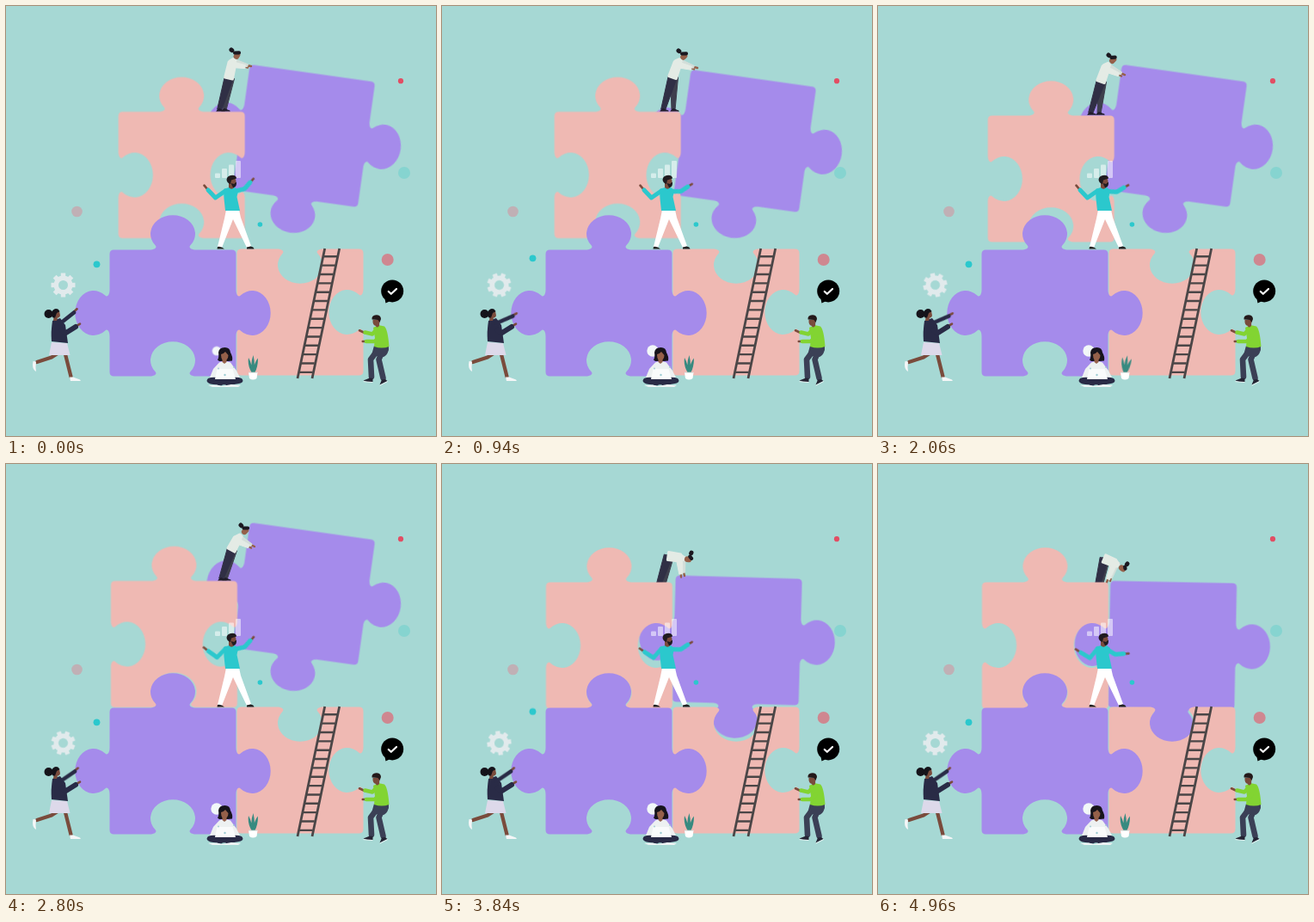
Write an HTML page that moves like this. It is 500 px wide and 500 px high and loops after 4.98 s.

```html
<!DOCTYPE html>
<html lang="en">
<head>
<meta charset="utf-8">
<title>Puzzle team</title>
<style>
html, body { margin: 0; width: 100%; height: 100%; overflow: hidden; background: #a6d8d4; }
svg { display: block; width: 100vw; height: 100vh; }
.pink { fill: #efb9b3; }
.purple { fill: #a58beb; }
.navy { fill: #292b46; color: #292b46; }
.skin { fill: #7a4b3c; color: #7a4b3c; }
.tan { fill: #95604a; color: #95604a; }
.teal { fill: #2bc8cd; color: #2bc8cd; }
.green { fill: #82d432; color: #82d432; }
.line, .line path { fill: none; stroke: currentColor; stroke-linecap: round; stroke-linejoin: round; }
.move { animation: 4.98s linear infinite; }

#tilted { animation-name: drop; }
@keyframes drop {
  0% { transform: translate(346.3px, 151px) rotate(8deg); animation-timing-function: ease-in-out; }
  19.3% { transform: translate(352.2px, 157px) rotate(8deg); animation-timing-function: ease-in-out; }
  39.8%, 62.8% { transform: translate(346.3px, 151px) rotate(8deg); animation-timing-function: cubic-bezier(.45, 0, .6, .92); }
  77.1% { transform: translate(343.2px, 205px) rotate(1.6deg); animation-timing-function: cubic-bezier(.2, .5, .5, 1); }
  100% { transform: translate(342.3px, 210.7px) rotate(1.1deg); }
}
#sliding { animation-name: slide; }
@keyframes slide {
  0%, 32% { transform: translate(204.2px, 196.5px); animation-timing-function: cubic-bezier(.25, 0, .45, 1); }
  66.3%, 100% { transform: translate(194.4px, 211px); }
}
#gear { animation-name: spin; transform-origin: 66.5px 324.5px; }
@keyframes spin { to { transform: rotate(-360deg); } }

#bob { animation-name: bob; animation-timing-function: ease-in-out; }
@keyframes bob {
  0%, 40%, 57%, 100% { transform: translateY(0); }
  19% { transform: translateY(-7px); }
  77% { transform: translateY(-12.5px); }
}
#wave { animation-name: wave; transform-origin: 266px 215px; animation-timing-function: ease-in-out; }
@keyframes wave {
  0% { transform: rotate(-32deg); }
  19% { transform: rotate(-17deg); }
  36%, 42% { transform: rotate(-14deg); }
  56.5% { transform: rotate(-31deg); }
  77% { transform: rotate(-17deg); }
  100% { transform: rotate(13deg); }
}
#lift { animation-name: lift; transform-origin: 254px 214px; animation-timing-function: ease-in-out; }
@keyframes lift {
  0%, 42% { transform: rotate(0deg); }
  56% { transform: rotate(-11deg); }
  77% { transform: rotate(-14deg); }
  100% { transform: rotate(-16deg); }
}
#reach { animation-name: reach; transform-origin: 65px 371px; animation-timing-function: ease-in-out; }
@keyframes reach {
  0% { transform: rotate(0deg); }
  19%, 42% { transform: rotate(15deg); }
  56.5%, 100% { transform: rotate(4deg); }
}
#leaves { animation-name: sway; transform-origin: 287px 426px; animation-timing-function: ease-in-out; }
@keyframes sway {
  0%, 19%, 56%, 77%, 100% { transform: rotate(0deg); }
  31%, 42% { transform: rotate(7deg); }
}
#thought { animation-name: swell; transform-origin: 245px 401px; animation-timing-function: ease-out; }
@keyframes swell { 0% { transform: scale(.78); } 8%, 100% { transform: scale(1); } }
</style>
</head>
<body>
<svg viewBox="0 0 500 500">
  <rect width="500" height="500" fill="#a6d8d4"/>

  <!-- puzzle and climber -->
  <g id="tilted" class="move"><path class="purple" data-sides="0 1 1 1"/></g>
  <g id="climber"></g>
  <g id="sliding" class="move"><path class="pink" data-sides="1 -1 -1 -1"/></g>
  <g transform="translate(342 356)"><path class="pink" data-sides="-1 -1 0 0"/></g>
  <g transform="translate(194 357)"><path class="purple" data-sides="1 1 -1 1"/></g>

  <!-- dots -->
  <circle cx="82.5" cy="239" r="6.3" fill="#c0b0b5"/>
  <circle id="bob" class="move" cx="105.5" cy="300.3" r="3.9" fill="#2bc8cd"/>
  <circle cx="295.4" cy="254" r="2.8" fill="#2bc8cd"/>
  <circle cx="459" cy="87.2" r="3.1" fill="#e24d63"/>
  <circle cx="463" cy="194" r="7" fill="#86d4d0"/>
  <circle cx="443.7" cy="295" r="7" fill="#cf8790"/>

  <!-- chart bars -->
  <g fill="#fff" opacity=".53">
    <rect x="243" y="194.5" width="6" height="5.5" rx="1"/>
    <rect x="251" y="189" width="6" height="11" rx="1"/>
    <rect x="259" y="184.5" width="6" height="15.5" rx="1"/>
    <rect x="267" y="180" width="6" height="20" rx="1"/>
  </g>

  <g id="gear" class="move" fill="none" stroke="#e1eaec"></g>

  <g id="ladder" fill="none" stroke="#4b4647"></g>

  <!-- chat badge -->
  <circle cx="449.2" cy="331.4" r="13"/>
  <path d="M440 338L441.5 345.5L449 342Z"/>
  <path class="line" color="#fff" d="M444.8 332L447.8 334.8L454 329" stroke-width="2.2"/>

  <!-- man in the middle -->
  <g>
    <path d="M256 237H271L273 246L285 279L280 281L264 248L251 281L246 280L254 247Z" fill="#fff"/>
    <path d="M246 280Q250 279 254 282.5H245.5ZM280 280.5L284.5 279.5Q288 280 288.5 282.5H280Z" fill="#222"/>
    <g id="lift" class="move line">
      <path class="skin" d="M235 214L230.5 208.7" stroke-width="2.6"/>
      <path class="teal" d="M255 215L243.5 223L235 214" stroke-width="5"/>
    </g>
    <g id="wave" class="move line">
      <path class="skin" d="M287 216L292 214.5" stroke-width="2.6"/>
      <path class="teal" d="M266 215.5L277 219L286.5 216" stroke-width="5"/>
    </g>
    <path class="teal" d="M253 213L259 211H266L270 214L268.5 222L272 238H255L253.5 224Z"/>
    <path class="skin" d="M259 206H265V211.5Q262 214 259 211Z"/>
    <ellipse class="skin" cx="263.5" cy="204" rx="4" ry="5"/>
    <path d="M256.5 202Q257 197 263 196.8Q268 197 268 200.5L262 202.5L261 207Q257 206 256.5 202ZM261.5 206L265 207L268 204.5Q268.5 211.5 264 211Z" fill="#201b20"/>
  </g>

  <!-- woman pushing on the left -->
  <g>
    <g class="line skin" stroke-width="4.2">
      <path d="M60 404L53 408.5L36 414"/>
      <path d="M69 405L75.5 431"/>
    </g>
    <path d="M31.5 413L35 413.5L34.5 420L35 425Q31 423 31 417ZM74 431.5L78 431.5L86 434.5Q88 436 85 436H75Z" fill="#f4f6f7"/>
    <path d="M53 391L71 392L74.5 406H50Z" fill="#ddd9ea"/>
    <path class="navy" d="M54 366L63 363L69 371L72 392L53 390Q52 379 54 366Z"/>
    <path class="line skin" d="M82 372L86 369.7" stroke-width="2.6"/>
    <path class="line navy" d="M65 377L69 380.5L81 373" stroke-width="6"/>
    <g id="reach" class="move line">
      <path class="skin" d="M79 355.5L82.5 352.3" stroke-width="2.6"/>
      <path class="navy" d="M63 369L67 366L79 356.5" stroke-width="4.6"/>
    </g>
    <path class="skin" d="M56 358L62 354.5L63 360Q62 363 60 362.5L59 366H55Z"/>
    <circle cx="49.5" cy="358" r="5" fill="#15131a"/>
    <path d="M53 356Q56 350.5 60.5 352.5L62.5 355L59 357L57 362.5Q52 363 53 356Z" fill="#15131a"/>
  </g>

  <!-- man pushing on the right -->
  <g>
    <path class="line" color="#3b4056" d="M433 399L424 411L425 431M439 399L433.5 411L438.5 432.5" stroke-width="6.6"/>
    <path d="M428 395H445L445 400Q442 410 435 408L425 406Z" fill="#3b4056"/>
    <path d="M423 432.5L426.5 433V437H420L415.5 435.5ZM437 434.5L441 434L443.5 436L434.5 440.5Z" fill="#252433"/>
    <path class="line" color="#eef4f4" d="M416 436.7L426 437.5M435 441L443.5 436.7" stroke-width=".9"/>
    <path class="green" d="M427 374L433 371L440 372.5Q444 376 445.5 396Q437 399 428 396L429 386Z"/>
    <g class="line skin" stroke-width="2.6"><path d="M417 380L411 377.3M418 390L414.8 390"/></g>
    <g class="line green" stroke-width="4.6"><path d="M431 376L426 381.5L417.5 379.5M434 385L429 390L419 390"/></g>
    <path class="skin" d="M426.5 365H434.5L434 372Q431 375 430 372Q426 371 426.5 365Z"/>
    <path d="M425.5 364.5Q425 359.5 430.5 359.3Q436 359.5 436 364L434.5 368L432.5 365Z" fill="#24191a"/>
  </g>

  <!-- woman with laptop -->
  <g>
    <circle id="thought" class="move" cx="245" cy="401" r="6.7" fill="#f2f8f8"/>
    <path d="M247 403Q247.5 397 254.5 397Q260.5 397 261 403Q264 408 263 412.5L258 413H248L246 411.5Q248 408 247 403Z" fill="#17141c"/>
    <path d="M248 414.5Q254 412 261 414.5L268 424L272 432H237L241 422Z" fill="#edf1f1"/>
    <path class="tan" d="M250 405Q253 404.5 255 402L258.5 406Q258.5 410 256.5 411.5V414L254 416L251.5 414V411.5Q250 409.5 250 405Z"/>
    <path class="navy" d="M235 433Q242 430 254.5 434Q267 430 274 433Q278 437 271 439L257 441.5Q254 439 250 441.5L238 439.5Q231 437 235 433Z"/>
    <path d="M235 441L245 440.5L251 442L262 440L273 441L270 443H240Z" fill="#edf3f4"/>
    <path d="M245.5 422H263.5L267 434H243Z" fill="#f9fbfb"/>
    <g fill="#9ccbd2"><circle cx="254.5" cy="429" r="1.2"/><circle cx="247" cy="421.5" r=".9"/><circle cx="265" cy="420" r=".9"/></g>
  </g>

  <!-- plant -->
  <g id="leaves" class="move" fill="#378a80">
    <path d="M286 427Q280.5 418 282 409Q286 416 287 427ZM286 427Q284 415 287.5 406Q290 416 288 427ZM287 427Q288.5 414 293 409.5Q293 420 289 427Z"/>
  </g>
  <path d="M282 426H292.5L291.5 433Q287 436 283 433Z" fill="#fff"/>
  <path d="M282 426.2H292.4" stroke="#d2dcd9"/>
</svg>

<script>
const LOOP = 4980;
const $ = id => document.getElementById(id);

function add(parent, tag, attrs) {
  const el = document.createElementNS('http://www.w3.org/2000/svg', tag);
  for (const k in attrs) el.setAttribute(k, attrs[k]);
  return parent.appendChild(el);
}

// Sides run top, right, bottom, left: 1 is a knob, -1 a notch, 0 flat.
function piecePath(sides) {
  const half = 73.5, r = 5;
  let d = '';
  sides.forEach((kind, i) => {
    const a = i * Math.PI / 2, c = Math.round(Math.cos(a)), s = Math.round(Math.sin(a));
    const turn = (u, v) => `${u * c - v * s} ${u * s + v * c} `;
    const at = (u, out) => turn(u, -half - out * kind);
    d += (i ? 'L' : 'M') + at(r - half, 0);
    if (kind) {
      d += 'L' + at(-27, 0) + 'C' + at(-21, 0) + at(-18, 2.8) + at(-20.4, 5.2);
      d += `A26 21.6 ${i * 90} 1 ${kind > 0 ? 1 : 0} ` + at(20.4, 5.2);
      d += 'C' + at(18, 2.8) + at(21, 0) + at(27, 0);
    }
    d += 'L' + at(half - r, 0) + 'Q' + turn(half, -half) + turn(half, r - half);
  });
  return d + 'Z';
}
document.querySelectorAll('[data-sides]').forEach(p =>
  p.setAttribute('d', piecePath(p.dataset.sides.split(' ').map(Number))));

add($('gear'), 'circle', { cx: 66.5, cy: 324.5, r: 8.2, 'stroke-width': 5.4 });
for (let i = 0; i < 8; i++)
  add($('gear'), 'path', { d: 'M66.5 315V310.5', 'stroke-width': 5.4, transform: `rotate(${i * 45} 66.5 324.5)` });

const slant = y => (y - 282) * 32 / 151;
let rungs = '';
for (let i = 0; i < 14; i++) {
  const y = 291.3 + i * 10.35;
  rungs += `M${371 - slant(y)} ${y}h16`;
}
add($('ladder'), 'path', { d: rungs, 'stroke-width': 2.4 });
add($('ladder'), 'path', { d: 'M370.7 282L339 433M387.7 282L356 433', 'stroke-width': 2.8 });

// Climber poses: time, then x,y of bun, head, shoulder, hip, two feet, hand.
const poses = [
  [0, 262, 51, 269, 57, 263, 66, 259, 84, 248, 121, 254, 121, 285, 70],
  [940, 275, 52, 282, 58, 274, 66, 268, 83, 257, 121, 269, 121, 297, 72],
  [1540, 270, 52, 276, 58, 268, 67, 262, 83, 251, 121, 264, 121, 290, 74],
  [2060, 268, 57, 274, 62, 265, 71, 259, 88, 247, 125, 257, 125, 287, 80],
  [2800, 273, 71, 279, 77, 269, 87, 262, 100, 250, 134, 255, 134, 289, 96],
  [3240, 274, 73, 280, 79, 270, 89, 262, 102, 251, 137, 256, 137, 289, 98],
  [3840, 290, 103, 287, 111, 277, 109, 263, 107, 251, 143, 257, 143, 282, 130],
  [4960, 290, 116, 285, 122, 275, 115, 263, 110, 254, 146, 258, 146, 270, 136]
];

// Smooth curve through the poses that never overshoots.
function poseAt(t) {
  const last = poses.length - 1;
  let i = 0;
  while (i < last - 1 && t > poses[i + 1][0]) i++;
  const slope = (j, k) => (poses[j + 1][k] - poses[j][k]) / (poses[j + 1][0] - poses[j][0]);
  const tangent = (j, k) => {
    if (j === 0 || j === last) return 0;
    const a = slope(j - 1, k), b = slope(j, k);
    return a * b <= 0 ? 0 : 2 * a * b / (a + b);
  };
  const p = poses[i], q = poses[i + 1], h = q[0] - p[0], u = Math.min(1, (t - p[0]) / h);
  const v = p.map((from, k) => {
    const w = u * u * (3 - 2 * u);
    return from + (q[k] - from) * w + h * u * (1 - u) * ((1 - u) * tangent(i, k) - u * tangent(i + 1, k));
  });
  const points = [];
  for (let k = 1; k < v.length; k += 2) points.push([v[k], v[k + 1]]);
  return points;
}

const part = (fill, width = 0) => add($('climber'), 'path',
  { fill, stroke: fill, 'stroke-width': width, 'stroke-linejoin': 'round', 'stroke-linecap': 'round' });
const backLeg = part('#3e3f4d', 1), frontLeg = part('#302f45', 1);
const shoes = part('#211d2b', 1), hands = part('#95604a', 2.4);
const backArm = part('#d3ded9', 1), torso = part('#e4ebe5', 3), frontArm = part('#e4ebe5', 1);
const face = part('#95604a', 6.6), hair = part('#1b1820', 4.2), bun = part('#1b1820', 5);

const mix = (a, b, k) => [a[0] + (b[0] - a[0]) * k, a[1] + (b[1] - a[1]) * k];
const shift = (p, x, y) => [p[0] + x, p[1] + y];

function limb(a, b, wa, wb) {
  const dx = b[0] - a[0], dy = b[1] - a[1], len = Math.hypot(dx, dy) || 1;
  const nx = -dy / len / 2, ny = dx / len / 2;
  return 'M' + [shift(a, nx * wa, ny * wa), shift(b, nx * wb, ny * wb),
    shift(b, -nx * wb, -ny * wb), shift(a, -nx * wa, -ny * wa)].join('L') + 'Z';
}

function drawClimber(t) {
  const [knot, head, shoulder, hip, footA, footB, hand] = poseAt(t);
  const set = (el, d) => el.setAttribute('d', d);
  const other = shift(hand, -4, 1.5);
  const shoe = f => `M${shift(f, -3, 1)}L${shift(f, 0, -1.5)}L${shift(f, 6, 1)}Z`;
  set(backLeg, limb(shift(hip, 2, 0), footB, 9, 4));
  set(frontLeg, limb(hip, footA, 10, 5));
  set(shoes, shoe(footA) + shoe(footB));
  set(hands, `M${mix(shoulder, hand, .8)}L${hand}M${mix(shoulder, other, .8)}L${other}`);
  set(backArm, limb(shift(shoulder, 3, -1), mix(shoulder, hand, .82), 6, 3));
  set(torso, limb(shoulder, hip, 8, 9) + limb(shoulder, mix(shoulder, head, .4), 7, 3));
  set(frontArm, limb(shift(shoulder, -1, 2), mix(shoulder, other, .84), 7, 4));
  set(face, `M${head}L${mix(head, shoulder, .18)}`);
  const dx = head[0] - knot[0], dy = head[1] - knot[1];
  const back = mix(head, knot, .42);
  set(hair, `M${back}L${shift(back, (dx + dy) * .38, (dy - dx) * .2)}`);
  set(bun, `M${knot}L${mix(knot, head, .12)}`);
}

function frame() {
  drawClimber(performance.now() % LOOP);
  requestAnimationFrame(frame);
}
frame();
</script>
</body>
</html>
```
